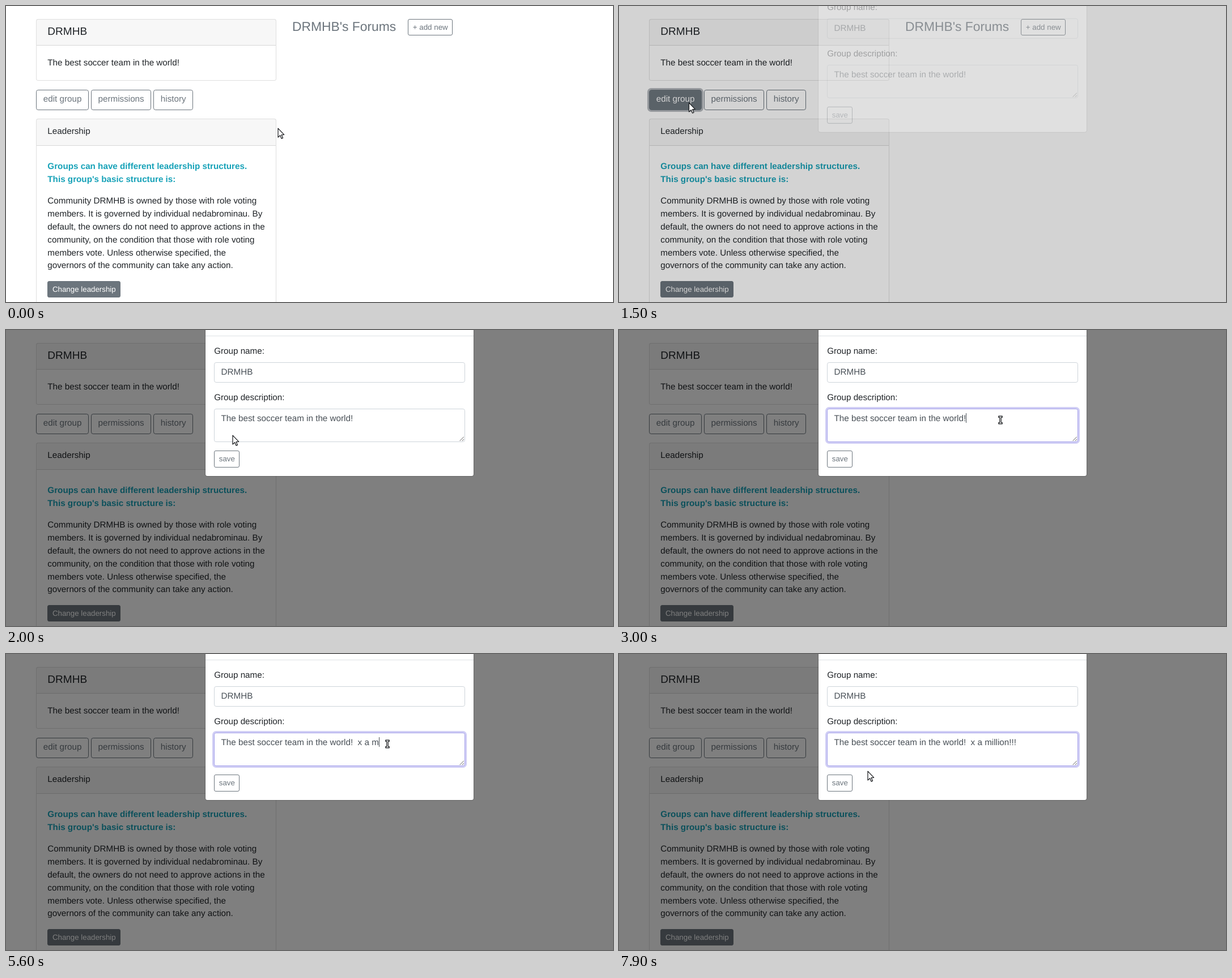
Recreate the animation shown at these times as an HTML page. Size 1071 by 523 pixels, loop 8 s.

```html
<!DOCTYPE html>
<html lang="en">
<head>
<meta charset="utf-8">
<title>Edit group</title>
<style>
  * { box-sizing: border-box; }
  html, body { margin: 0; width: 100%; height: 100%; overflow: hidden; background: #fff; }
  body { position: relative; }
  #page {
    position: absolute; left: 0; top: 0; width: 1125px; height: 550px; overflow: hidden;
    zoom: .952;
    font: 16px/24px "Liberation Sans", Arial, sans-serif; color: #212529;
    text-rendering: geometricPrecision; white-space: nowrap;
  }
  .left { position: absolute; left: 56px; top: 24px; width: 445px; }
  .card { border: 1px solid rgba(0,0,0,.125); border-radius: 4px; margin-bottom: 16px; background: #fff; }
  .card-header {
    height: 49px; padding: 12px 20px; background: rgba(0,0,0,.03);
    border-bottom: 1px solid rgba(0,0,0,.125);
  }
  .card-body { padding: 20px; }
  .leadership { height: 420px; }
  .title { font-size: 20px; }
  .info { margin: 8px 0 16px; font-weight: 700; color: #17a2b8; white-space: pre-line; }
  .rules { margin: 0 0 15.3px; white-space: pre-line; }
  .buttons { display: flex; gap: 4.45px; margin-bottom: 16px; }
  .btn {
    display: block; width: max-content; height: 38px; padding: 6px 12px;
    border: 1px solid #6c757d; border-radius: 4px; color: #6c757d;
  }
  .small { height: 31px; padding: 4px 8px; font-size: 14px; line-height: 21px; border-radius: 3.2px; }
  .solid { background: #6c757d; color: #fff; }
  .forums { position: absolute; left: 530.5px; top: 24.4px; font-size: 24px; line-height: 28.8px; color: #6c757d; }
  .add { position: absolute; left: 745px; top: 24px; }
  #backdrop { position: absolute; inset: 0; background: #000; opacity: 0; }
  #modal {
    position: absolute; left: 368.6px; top: -60px; width: 499.4px;
    background: #fff; background-clip: padding-box;
    border: 1px solid rgba(0,0,0,.2); border-radius: 4.8px;
    opacity: 0; transform: translateY(-50px);
  }
  .modal-header { height: 71px; border-bottom: 1px solid #dee2e6; }
  .modal-body { padding: 16px; }
  .label { margin-bottom: 8px; }
  .field {
    position: relative; height: 38px; padding: 6px 12px; margin-bottom: 16px;
    border: 1px solid #ced4da; border-radius: 4px; color: #495057; background: #fff; white-space: pre;
  }
  .area { height: 62px; }
  .area svg { position: absolute; right: 1px; bottom: 1px; }
  #caret { display: inline-block; width: 1px; height: 18px; vertical-align: -4px; background: #495057; }
  #cursor { position: absolute; left: 0; top: 0; overflow: visible; }
  #cursor path { fill: #fff; stroke: #15171a; stroke-width: 1.2; stroke-linejoin: round; }
</style>
</head>
<body>
<div id="page">
  <div class="left">
    <div class="card">
      <div class="card-header title">DRMHB</div>
      <div class="card-body">The best soccer team in the world!</div>
    </div>
    <div class="buttons">
      <span class="btn" id="edit">edit group</span>
      <span class="btn">permissions</span>
      <span class="btn">history</span>
    </div>
    <div class="card leadership">
      <div class="card-header">Leadership</div>
      <div class="card-body">
        <p class="info">Groups can have different leadership structures.
This group's basic structure is:</p>
        <p class="rules">Community DRMHB is owned by those with role voting
members. It is governed by individual nedabrominau. By
default, the owners do not need to approve actions in the
community, on the condition that those with role voting
members vote. Unless otherwise specified, the
governors of the community can take any action.</p>
        <span class="btn small solid">Change leadership</span>
      </div>
    </div>
  </div>
  <div class="forums">DRMHB's Forums</div>
  <span class="btn small add">+ add new</span>

  <div id="backdrop"></div>
  <div id="modal">
    <div class="modal-header"></div>
    <div class="modal-body">
      <div class="label">Group name:</div>
      <div class="field">DRMHB</div>
      <div class="label">Group description:</div>
      <div class="field area" id="area"><span id="text"></span><span id="caret"></span><svg width="9" height="9"><path d="M.5 8.5l8-8M5 8.5L8.5 5" stroke="#555" fill="none"/></svg></div>
      <span class="btn small">save</span>
    </div>
  </div>
</div>

<svg id="cursor" width="1" height="1">
  <path id="arrow" d="M0 .2V16L3.7 12.6 6.1 18.2 8.5 17.1 6.1 11.7 10.7 11.3Z"/>
  <path id="hand" d="M-1 1.2Q.5-.6 2 1.2V6.3Q3.6 5.5 4.7 6.8 6.2 6.2 7.1 7.4 9.6 7 9.7 9.2V12.4L8.7 15.8H.6L-3.2 10.6Q-3.8 8.5-1.8 8.7L-1 9.6Z"/>
  <path id="beam" d="M-3.2-6.8H3.2V-4.6H1.2V4.6H3.2V6.8H-3.2V4.6H-1.2V-4.6H-3.2Z"/>
</svg>

<script>
const LOOP = 8000, STEP = 100, BLINK = 600;
const $ = id => document.getElementById(id);

// Transitions, driven by hand so that they follow the stepped clock.
const transitions = [];
function transition(id, to, delay, duration, easing = 'ease-in-out') {
  const anim = $(id).animate(to, { delay, duration, easing, fill: 'forwards' });
  anim.pause();
  transitions.push(anim);
}
const ring = color => '0 0 0 3.2px ' + color;

transition('edit', { backgroundColor: '#6c757d', color: '#fff' }, 840, 150);
transition('edit', { boxShadow: ring('rgba(108,117,125,.5)') }, 1440, 50);
transition('edit', { backgroundColor: 'rgba(108,117,125,0)', color: '#6c757d' }, 1490, 160);
transition('edit', { boxShadow: ring('rgba(108,117,125,0)') }, 1750, 150);
transition('backdrop', { opacity: .5 }, 1439, 177, 'linear');
transition('modal', { opacity: 1 }, 1449, 174, 'linear');
transition('modal', { transform: 'translateY(0px)' }, 1439, 365, 'ease-out');
transition('area', { borderColor: '#a5a2ea', boxShadow: ring('#d0cef5') }, 2450, 150);

// Cursor waypoints: time, x, y
const path = [
  [500, 480, 216], [600, 430, 226], [700, 310, 230], [800, 180, 206], [900, 130, 177],
  [1000, 123.5, 171], [1700, 123.5, 171], [2000, 400, 186], [2200, 645, 162], [2300, 673, 159],
  [7500, 673, 159], [7600, 645, 164], [7800, 480, 202], [7900, 439, 207]
];
function cursorAt(t) {
  const i = path.findIndex(p => p[0] > t);
  if (i < 0) return path[path.length - 1].slice(1);
  if (i === 0) return path[0].slice(1);
  const [a, b] = [path[i - 1], path[i]];
  const k = (t - a[0]) / (b[0] - a[0]);
  return [1, 2].map(n => a[n] + (b[n] - a[n]) * k);
}
function shapeAt(t) {
  if (t >= 900 && t < 1500) return 'hand';
  return t >= 2200 && t < 7800 ? 'beam' : 'arrow';
}

// Typed pieces: time, text
const typing = [
  [2700, 'The best soccer team in the world!'],
  [4300, ' '], [4400, ' '], [4500, 'x'], [5200, ' '], [5300, 'a'], [5500, ' '], [5600, 'm'],
  [5800, 'i'], [5900, 'l'], [6100, 'l'], [6200, 'i'], [6300, 'o'], [6700, 'n!'],
  [7200, '!'], [7300, '!']
];

function render(t) {
  for (const anim of transitions) anim.currentTime = t;

  const typed = typing.filter(([at], i) => i === 0 || at <= t);
  const lastKey = typed[typed.length - 1][0];
  const caretOn = t >= 2500 && (t < lastKey || Math.floor((t - lastKey) / BLINK) % 2 === 0);
  $('text').textContent = typed.map(p => p[1]).join('');
  $('caret').style.visibility = caretOn ? 'inherit' : 'hidden';

  const [x, y] = cursorAt(t);
  $('cursor').style.transform = `translate(${x}px, ${y}px)`;
  for (const id of ['arrow', 'hand', 'beam']) $(id).style.display = id === shapeAt(t) ? '' : 'none';
}

function tick() {
  render(Math.floor(performance.now() % LOOP / STEP) * STEP);
  requestAnimationFrame(tick);
}
tick();
</script>
</body>
</html>
```
